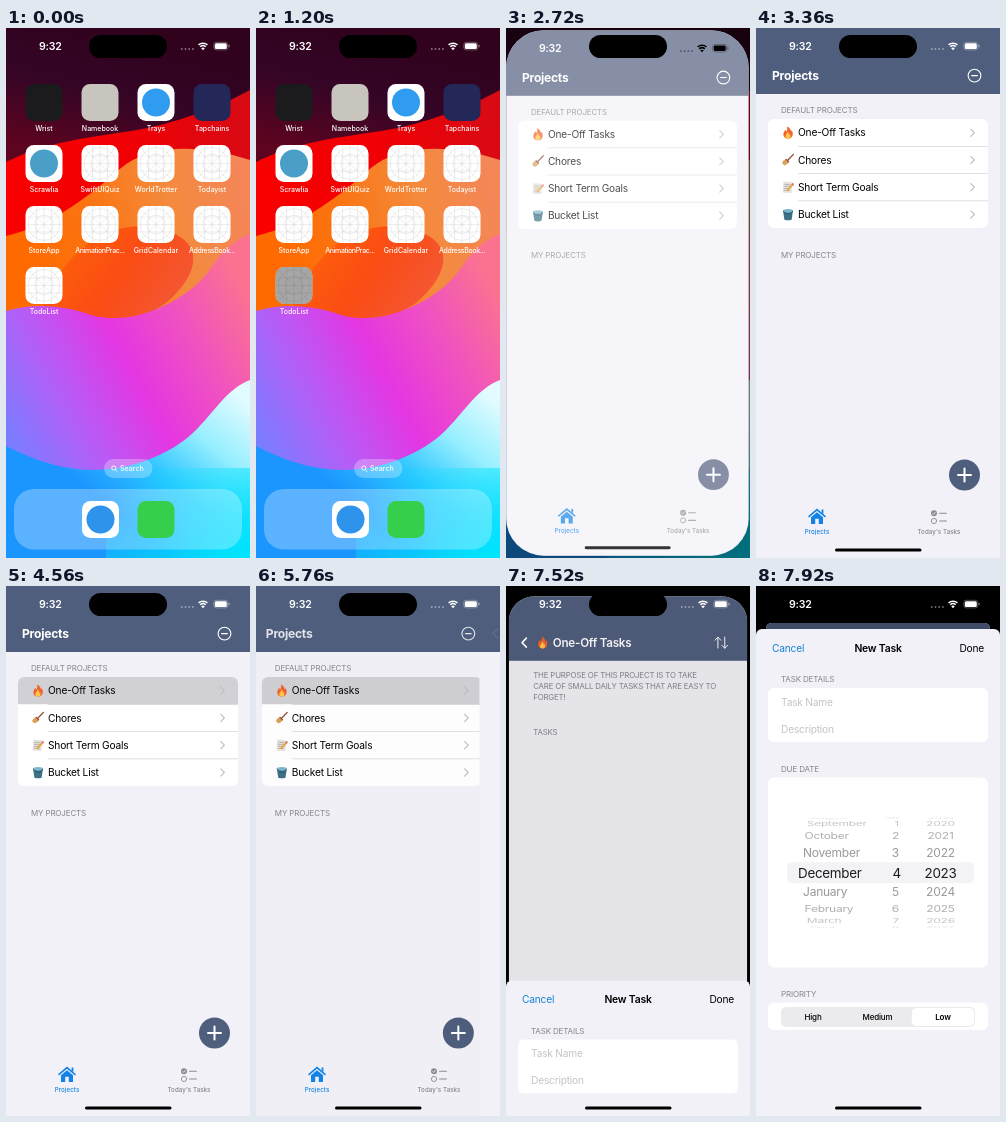
Write an HTML page with a canvas that moves like this. It is 244 px wide and 530 px high and loops after 8000 ms.

```html
<!DOCTYPE html>
<html lang="en">
<head>
<meta charset="utf-8">
<title>Task list</title>
<style>
  html, body { margin: 0; width: 100%; height: 100%; overflow: hidden; background: #000; }
  canvas { display: block; width: 244px; height: 530px; }
</style>
</head>
<body>
<canvas id="stage"></canvas>
<script>
const W = 244, H = 530, LOOP = 8000, STEP = 80, NAV_H = 66;
const NAV = '#505e7e', BG = '#f2f1f7', GREY = '#85858a', BLUE = '#1283e6';
const dpr = window.devicePixelRatio || 1;

function prepare(canvas) {
  canvas.width = W * dpr;
  canvas.height = H * dpr;
  const g = canvas.getContext('2d');
  g.scale(dpr, dpr);
  return g;
}
const main = prepare(document.getElementById('stage'));
let c = main;

// ---------- helpers ----------
const lerp = (a, b, p) => a + (b - a) * p;
const clamp = v => Math.max(0, Math.min(1, v));
const spring = (ms, speed) => {
  const x = Math.max(0, ms) / 1000 * speed;
  return 1 - (1 + x) * Math.exp(-x);
};

function group(draw, alpha = 1) {
  c.save();
  c.globalAlpha *= alpha;
  draw();
  c.restore();
}
function rect(x, y, w, h, color) {
  c.fillStyle = color;
  c.fillRect(x, y, w, h);
}
function roundPath(x, y, w, h, r) {
  c.beginPath();
  c.roundRect(x, y, w, h, r);
}
function round(x, y, w, h, r, color) {
  roundPath(x, y, w, h, r);
  c.fillStyle = color;
  c.fill();
}
function disc(x, y, r, color) {
  c.beginPath();
  c.arc(x, y, r, 0, 7);
  c.fillStyle = color;
  c.fill();
}
function ring(x, y, r, color, width) {
  c.beginPath();
  c.arc(x, y, r, 0, 7);
  c.strokeStyle = color;
  c.lineWidth = width;
  c.stroke();
}
function line(d, color, width) {
  c.strokeStyle = color;
  c.lineWidth = width;
  c.lineCap = c.lineJoin = 'round';
  c.stroke(new Path2D(d));
}
function shape(d, color) {
  c.fillStyle = color;
  c.fill(new Path2D(d));
}
// y is the middle of the capitals
function text(s, x, y, size, color, weight = 400, align = 'left', track = -0.02) {
  c.font = `${weight} ${size}px Inter, Roboto, sans-serif`;
  c.letterSpacing = `${size * track}px`;
  c.textAlign = align;
  c.fillStyle = color;
  c.fillText(s, x, y + size * 0.363);
}
function gradient(x0, y0, x1, y1, ...colors) {
  const g = c.createLinearGradient(x0, y0, x1, y1);
  colors.forEach((col, i) => g.addColorStop(i / (colors.length - 1), col));
  return g;
}

// ---------- system parts ----------
function status(timeColor, iconColor) {
  text('9:32', 33, 18.2, 10.6, timeColor, 600);
  group(() => {
    for (let i = 0; i < 4; i++) disc(175.8 + i * 3.7, 21, 0.9, iconColor);
  }, 0.45);
  c.strokeStyle = iconColor;
  c.lineWidth = 1.6;
  c.lineCap = 'butt';
  for (const r of [6.6, 4.1]) {
    c.beginPath();
    c.arc(197, 21.8, r, -2.3, -0.84);
    c.stroke();
  }
  shape('M197 22.3 L195.2 20.3 Q197 18.9 198.8 20.3 Z', iconColor);
  group(() => {
    roundPath(207.8, 14.3, 14, 7.6, 2.4);
    c.strokeStyle = iconColor;
    c.lineWidth = 0.6;
    c.stroke();
    round(222.6, 16.8, 0.9, 2.7, 0.5, iconColor);
  }, 0.5);
  round(208.8, 15.3, 12, 5.6, 1.5, iconColor);
}
const island = () => round(83, 7, 78, 23, 11.5, '#000');
const homeBar = (y = 520.6) => round(79, y, 86.5, 3, 1.5, '#000');

// ---------- home screen ----------
function wallpaper() {
  rect(0, 0, W, H, gradient(130, 0, 95, 135, '#30021c', '#340526', '#5c0420'));
  shape('M0 134C40 114 80 110 125 103S215 78 244 62V300H0Z',
    gradient(0, 120, 244, 100, '#fa0000', '#f00004', '#d80a14'));
  shape('M0 208C50 196 85 166 115 140C140 118 190 114 244 132V300H0Z',
    gradient(20, 240, 244, 190, '#ff6a00', '#fb7412', '#f48a3c', '#f48658'));
  shape('M30 300C50 225 100 190 150 200S196 244 160 275L120 300Z',
    gradient(50, 200, 180, 290, '#ff6408', '#fa4c14', '#f25a3c'));
  shape('M0 283C30 274 60 278 85 287C130 300 185 270 205 240Q222 214 244 206V530H0Z',
    gradient(0, 400, 244, 270, '#7c7cff', '#b75cf6', '#e436e2', '#f052c0', '#fb7290'));
  shape('M244 352C222 360 208 384 190 402C160 432 110 446 70 441C40 437 20 428 0 418V530H244Z',
    gradient(236, 370, 130, 500, '#e2fbff', '#96efff', '#2cc4ff', '#1c96ff'));
  // bright cyan rising from the lower right
  shape('M100 530V440H244V530Z', gradient(150, 430, 230, 530, '#00e4ff00', '#00e4ff'));
}

// blank app tile with guide lines
function tile(x, y, s, color) {
  group(() => {
    roundPath(x, y, s, s, s * 0.23);
    c.fillStyle = '#fff';
    c.fill();
    c.clip();
    c.translate(x, y);
    c.scale(s / 100, s / 100);
    for (const r of [43, 25]) ring(50, 50, r, color, 1);
    line('M0 50H100M50 0V100M0 0L100 100M100 0L0 100M30 0V100M70 0V100M0 30H100M0 70H100', color, 0.9);
  });
}

// label, tile colour, colour of a plain mark
const APPS = [
  ['Wrist', '#1b1b1e'], ['Namebook', '#c8c4be'], ['Trays', '#fff', '#2f9cf0'], ['Tapchains', '#232858'],
  ['Scrawlia', '#fff', '#4a9fc8'], ['SwiftUIQuiz'], ['WorldTrotter'], ['Todayist'],
  ['StoreApp'], ['AnimationPrac...'], ['GridCalendar'], ['AddressBook...'], ['TodoList']
];

function icon(x, y, color, mark) {
  round(x - 18.5, y - 18.5, 37, 37, 8.5, color);
  if (mark) disc(x, y, 14, mark);
}

function icons() {
  APPS.forEach(([name, color, mark], i) => {
    const x = 38 + i % 4 * 56, y = 74.5 + (i >> 2) * 61;
    if (color) icon(x, y, color, mark);
    else tile(x - 18.5, y - 18.5, 37, '#cacaca');
    text(name, x, y + 26.3, 7, '#fff', 500, 'center', name.endsWith('...') ? -0.05 : 0);
  });
  round(98, 431, 48.5, 19, 9.5, 'rgba(255,255,255,.28)');
  ring(107.8, 440, 2.1, '#fff', 0.9);
  line('M109.4 441.7L111.2 443.5', '#fff', 0.9);
  text('Search', 114, 440.5, 7.1, '#fff', 500, 'left', 0);
  round(8, 461, 228, 60.5, 20, 'rgba(255,255,255,.28)');
  icon(94.5, 491.5, '#fff', '#2e93ea');
  icon(150, 491.5, '#35cf4c');
}

const layer = document.createElement('canvas');
c = prepare(layer);
icons();
c = main;

function home(pressed, p = 0) {
  wallpaper();
  group(() => {
    const k = 1 - 0.02 * p;
    if (p) c.filter = `blur(${3.5 * p * dpr}px)`;
    c.translate(W / 2, H / 2);
    c.scale(k, k);
    c.drawImage(layer, -W / 2, -H / 2, W, H);
  });
  if (pressed) round(19.5, 239, 37, 37, 8.5, 'rgba(0,0,0,.35)');
  if (p) rect(0, 0, W, H, `rgba(0,0,0,${0.52 * p * p})`);
  status('#fff', '#fff');
}

// ---------- small pictures, centred on 0,0 in a 12px box ----------
const pics = {
  flame() {
    shape('M0 6C-4 6 -5 3 -4.4 .4C-4 -1 -3.2 -1.6 -3 -3C-2.2 -2.4 -1.8 -1.8 -1.7 -1C-.6 -2.4 -.4 -4.4 -1.2 -6.2C2 -5 3 -2.6 3 -1C3.4 -1.4 3.6 -2 3.6 -2.6C4.8 -.8 5 1 4.6 2.6C4 5 2.4 6 0 6Z', '#f2622a');
    shape('M0 6C-2.4 6 -3 4.2 -2.4 2.6C-2 1.6 -.6 .8 -.6 -1C1.2 0 1.4 1.4 1.4 2.2C1.8 2 2 1.6 2 1.2C3 3 2.8 6 0 6Z', '#ffc84a');
  },
  broom() {
    line('M5.4 -5.6L-1 1', '#8c4a3a', 1.3);
    shape('M-2 -1L1 2Q-.6 5 -3.6 5.6L-6 3Q-5 0 -2 -1Z', '#d6a25e');
    line('M-1.8 -.6L.6 1.8', '#a8433a', 1.2);
  },
  memo() {
    group(() => {
      c.rotate(0.08);
      rect(-5, -5.2, 9, 10.8, '#e6e3dc');
      line('M-3.4 -2.6H2.2M-3.4 -.6H1.6M-3.4 1.4H.6M-3.4 3.4H1.6', '#9a9a9e', 0.6);
    });
    line('M4.6 -2.6L-.4 3', '#eea53a', 1.9);
    line('M5 -3.2L4.6 -2.6', '#e0707a', 1.9);
  },
  bucket() {
    shape('M-5 -3.6H5L3.6 5.2Q0 6.6 -3.6 5.2Z', '#3d7187');
    shape('M-5 -3.6A5 1.8 0 0 1 5 -3.6A5 1.8 0 0 1 -5 -3.6Z', '#79b6cc');
    line('M-4.8 -3.2Q1 3.4 4.8 -3.2', '#274c5c', 0.7);
  }
};
function pic(name, x, y) {
  group(() => {
    c.translate(x, y);
    pics[name]();
  });
}

// ---------- app ----------
function plusButton(alpha = 1) {
  group(() => {
    disc(208.5, 447, 15.5, NAV);
    line('M202 447H215M208.5 440.5V453.5', '#fff', 2);
  }, alpha);
}

const ROWS = [['flame', 'One-Off Tasks'], ['broom', 'Chores'], ['memo', 'Short Term Goals'], ['bucket', 'Bucket List']];

function listBody(lit) {
  rect(0, 0, W, H, BG);
  text('DEFAULT PROJECTS', 25, 82.2, 8, GREY);
  round(12, 91, 220, 109, 6, '#fff');
  if (lit) round(12, 91, 220, 27.3, [6, 6, 0, 0], '#d1d0d5');
  ROWS.forEach(([name, label], i) => {
    const y = 104.7 + i * 27.25;
    pic(name, 32, y);
    text(label, 42, y, 10.2, '#000');
    line(`M214.8 ${y - 3.6}L218.4 ${y}L214.8 ${y + 3.6}`, '#bcbcc0', 1.1);
    if (i) rect(42, y - 13.8, 190, 0.5, '#c2c2c6');
  });
  text('MY PROJECTS', 25, 226.6, 8, GREY);
  plusButton();
}
function listNav() {
  text('Projects', 16, 47.6, 12.1, '#fff', 700);
  ring(218.5, 47.6, 6.4, '#fff', 1.1);
  line('M215.6 47.6H221.4', '#fff', 1.1);
}

function taskBody(pressed) {
  rect(0, 0, W, H, BG);
  ['THE PURPOSE OF THIS PROJECT IS TO TAKE', 'CARE OF SMALL DAILY TASKS THAT ARE EASY TO', 'FORGET!']
    .forEach((s, i) => text(s, 25, 81 + i * 11.2, 8, GREY));
  text('TASKS', 25, 138.6, 8, GREY);
  plusButton(pressed ? 0.5 : 1);
}
function taskNav() {
  line('M18 42.8L13.6 47.4L18 52', '#fff', 1.7);
  pic('flame', 34.6, 47.4);
  text('One-Off Tasks', 45, 47.4, 11.9, '#fff', 600);
  line('M214 53V42M211 45L214 41.8L217 45M221 41.8V53M218 50L221 53.2L224 50', '#fff', 1);
}

function tabs() {
  shape('M61 480.6L70 488.2L69 489.4L61 482.8L53 489.4L52 488.2Z', BLUE);
  shape('M65.6 481.4H67.4V486L65.6 484.4Z', BLUE);
  shape('M61 484.2L67 489.2V496H62.8V490.8H59.2V496H55V489.2Z', BLUE);
  text('Projects', 61, 503.6, 6.2, BLUE, 500, 'center', 0.01);
  disc(178, 485.3, 3, '#8c8c90');
  line('M176.7 485.4L177.7 486.4L179.4 484.2', '#fff', 0.7);
  ring(178, 493, 2.6, '#8c8c90', 0.9);
  line('M183.6 485.3H190.4M183.6 493H190.4', '#8c8c90', 1.1);
  text("Today's Tasks", 183, 503.6, 6.2, GREY, 500, 'center', 0.01);
}

// p: 0 shows the list, 1 the pushed page
function app(p, lit, pressed) {
  if (p < 1) {
    group(() => {
      c.translate(-0.3 * W * p, 0);
      listBody(lit);
    });
    rect(0, 0, W, H, `rgba(0,0,0,${0.1 * p})`);
  }
  if (p > 0) {
    group(() => {
      c.translate(W * (1 - p), 0);
      taskBody(pressed);
    });
  }
  rect(0, 0, W, NAV_H, NAV);
  group(() => {
    c.translate(-0.3 * W * p, 0);
    listNav();
  }, clamp(1 - 2 * p));
  group(() => {
    c.translate(W * (1 - p), 0);
    taskNav();
  }, p);
  tabs();
}

// app window growing out of its icon
function launch(t) {
  const p = spring(t - 2325, 18);
  const w = lerp(37, W, p), h = lerp(37, H, p ** 1.37), k = w / W;
  const x = lerp(38, W / 2, p) - w / 2, y = lerp(257.5, H / 2, p) - h / 2;
  const veil = clamp(1 - (t - 2400) / 460);
  home(false, p);
  group(() => {
    roundPath(x, y, w, h, lerp(9, 38, p));
    c.clip();
    c.translate(x, y);
    c.scale(k, k);
    app(0);
    rect(0, 0, W, H, `rgba(255,255,255,${veil})`);
    group(() => {
      tile(0, 0, W, '#ececee');
      rect(44, W, 156, H, gradient(44, 0, 200, 0, '#fff', '#ececee', '#eeeeef', '#ececee', '#fff'));
    }, clamp(1 - (t - 2400) / 160));
    status(veil > 0.5 ? '#000' : '#fff', veil > 0.25 ? '#000' : '#fff');
    group(() => homeBar(h / k - 9.4), 1 - 0.7 * veil);
  });
}

// ---------- new task sheet ----------
const MONTHS = 'January February March April May June July August September October November December'.split(' ');
const SHADES = ['#1c1c1e', '#98989b', '#aeaeb1', '#c4c4c7', '#e2e2e4'];

function wheels(y) {
  round(31, y - 10.5, 187, 21, 5, '#f3f2f5');
  for (let d = -4; d <= 4; d++) {
    const a = d * 0.363, cos = Math.cos(a), size = d ? 12 : 13.4, color = SHADES[Math.abs(d)];
    group(() => {
      c.translate(0, y + 55 * Math.sin(a));
      c.scale(1, cos);
      text(MONTHS[(23 + d) % 12], d ? 46.5 + 8 * (1 - cos) : 42, 0, size, color);
      text(4 + d || 30, d ? 143 : 145, 0, size, color, 400, 'right');
      text(2023 + d, 184.5, 0, size, color, 400, 'center');
    });
  }
}

function sheet(top) {
  group(() => {
    c.translate(0, top);
    round(0, 0, W, H, [6, 6, 0, 0], BG);
    text('Cancel', 16, 19, 10.2, '#1682d4');
    text('New Task', 122, 19, 10.4, '#000', 600, 'center');
    text('Done', 228, 19, 10.2, '#000', 400, 'right');
    text('TASK DETAILS', 25, 50.2, 8, GREY);
    round(12, 59, 220, 54, 6, '#fff');
    text('Task Name', 25, 73, 10.2, '#c4c4c7');
    text('Description', 25, 100, 10.2, '#c4c4c7');
    text('DUE DATE', 25, 140.2, 8, GREY);
    round(12, 148.5, 220, 190, 6, '#fff');
    wheels(243.7);
    text('PRIORITY', 25, 365.2, 8, GREY);
    round(12, 373.5, 220, 27.5, 6, '#fff');
    round(25, 378, 194, 20, 5, '#ebebed');
    round(155.8, 379, 62.2, 18, 4.5, '#fff');
    text('High', 57, 388.3, 8, '#000', 500, 'center');
    text('Medium', 121.5, 388.3, 8, '#000', 500, 'center');
    text('Low', 187, 388.3, 8, '#000', 600, 'center');
  });
}

function present(t) {
  const p = Math.min(1, spring(t - 7438, 12.5) / 0.983);
  const k = lerp(1, 0.918, p);
  rect(0, 0, W, H, '#000');
  group(() => {
    c.translate(W * (1 - k) / 2, 37 * p);
    c.scale(k, k);
    roundPath(0, 0, W, H, lerp(34, 6, p));
    c.clip();
    app(1, false, t < 7520);
    rect(0, 0, W, H, `rgba(0,0,0,${0.2 * p})`);
  });
  sheet(lerp(H, 43, p));
  status('#fff', '#fff');
  homeBar();
}

// ---------- timeline ----------
function draw(t) {
  if (t < 2400) home(t >= 1200);
  else if (t < 3200) launch(t);
  else if (t < 7440) {
    const p = t < 5760 ? 0 : t >= 6400 ? 1 : spring(t - 5730, 16);
    app(p, t >= 4560, t >= 6960);
    status('#fff', '#fff');
    homeBar();
  } else present(t);
  island();
}

const start = performance.now();
function tick() {
  const t = (performance.now() - start) % LOOP;
  draw(Math.floor(t / STEP) * STEP);
  requestAnimationFrame(tick);
}
tick();
</script>
</body>
</html>
```
